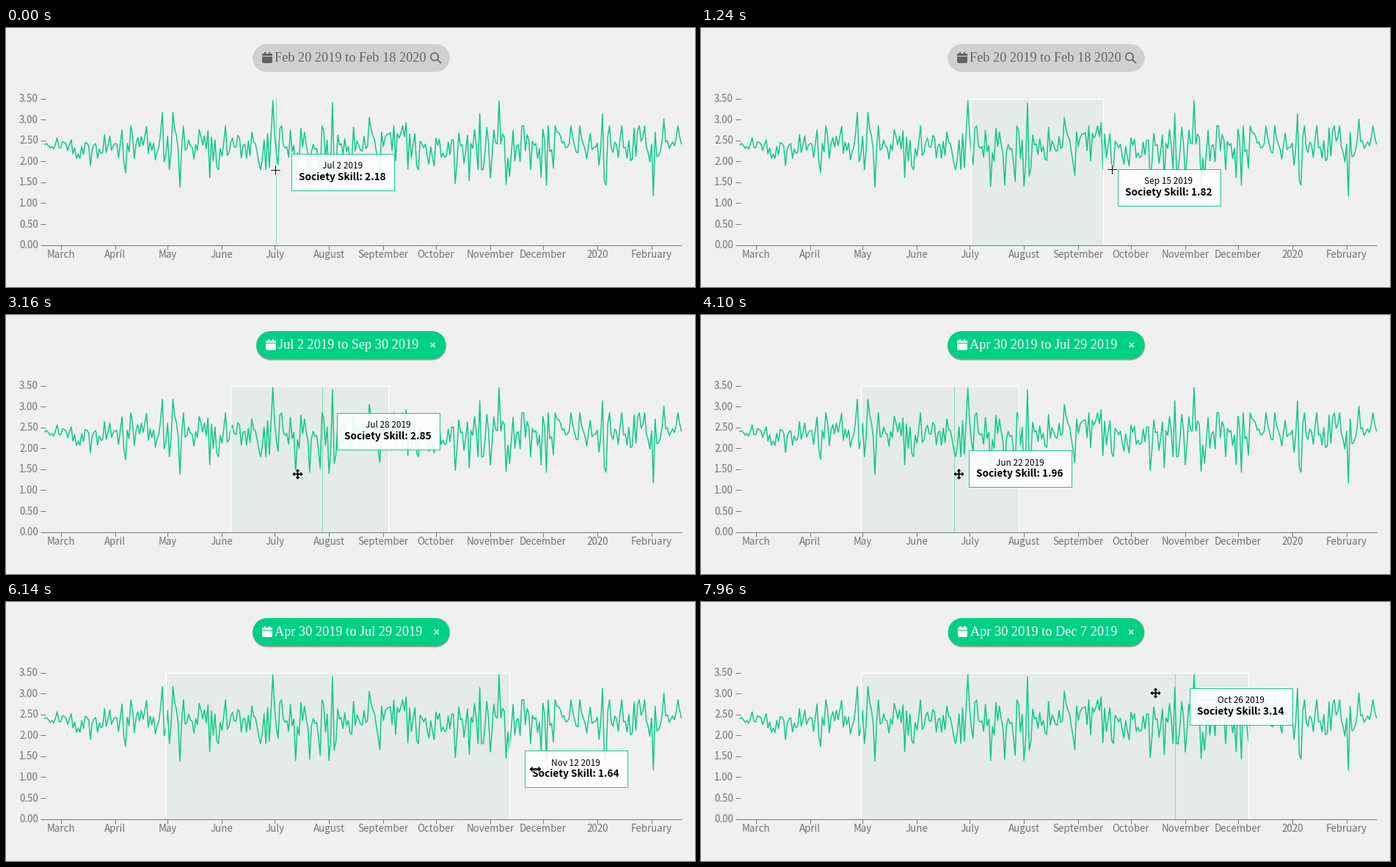
A matplotlib script that plays this animation: 939 px wide and 354 px high, repeating every 8 s.

```python
import numpy as np
import matplotlib.pyplot as plt
from matplotlib.animation import FuncAnimation
from matplotlib.collections import PolyCollection
from matplotlib.patches import Polygon, Rectangle

W, H = 939, 354
LOOP, STEP = 8000, 20
DAYS = 364
FIRST_DAY = np.datetime64("2019-02-20")
BG, GREEN, GREY, INK, AXIS = "#f0f0f0", "#00d084", "#d0d0d0", "#646464", "#727272"
SANS, SERIF = "Noto Sans CJK JP", "Liberation Serif"
MONTHS = ("January February March April May June July August September "
          "October November December").split()
PILL_X, PILL_Y, PILL_R = 470.5, 41, 19

# The tallest highs and deepest lows, day: value
EXTREMES = {
    46: 1.73, 67: 3.17, 73: 3.17, 77: 1.38, 94: 1.61, 122: 1.96, 130: 3.45,
    132: 2.18, 143: 1.4, 151: 1.43, 157: 1.52, 159: 2.73, 162: 1.4,
    164: 3.4, 165: 1.64, 185: 3.05, 191: 1.66, 205: 2.59, 206: 2.92,
    207: 1.82, 234: 1.47, 242: 1.54, 248: 3.14, 254: 1.6, 259: 3.45,
    263: 1.45, 265: 1.64, 283: 1.61, 286: 1.43, 318: 3.13, 319: 1.54,
    320: 1.43, 347: 1.17, 353: 3.01,
}

# Each move: start and end time, easing power, then the state it leads to:
# cursor x, cursor y, hovered day, first and last day of the brush
REST = (367, 194, 132, 132, 132)
MOVES = [
    (540, 1290, 0.70, 560, 193, 211, 132, 211),   # draw the brush
    (1350, 1530, 1.0, 586, 194, 222, 132, 222),
    (1710, 1760, 1.0, 586, 210, 222, 132, 222),   # release
    (2120, 2630, 0.66, 491, 218, 184, 132, 222),
    (3040, 3510, 0.80, 341, 217, 121, 69, 159),   # slide the brush
    (3980, 4630, 2.5, 439, 224, 161, 69, 159),    # release
    (4990, 5320, 0.70, 430, 226, 159, 69, 159),
    (5620, 6310, 0.75, 740, 229, 288, 69, 288),   # stretch the brush
    (6430, 6430, 1.0, 743, 229, 288, 69, 290),
    (6610, 6790, 1.0, 737, 225, 288, 69, 290),    # release
    (7690, 7960, 1.0, 619, 124, 248, 69, 290),
]
RELEASES = (1710, 3980, 6610)
STRETCH = (5620, 6430)
TICK, LEAD = 57, 2  # ms per visible step; steps the pointer runs ahead


def day_x(day):
    return 53 + day * 867.5 / (DAYS - 1)


def value_y(value):
    return 296.5 - value * 200 / 3.5


def date_text(day):
    year, month, date = str(FIRST_DAY + int(round(day))).split("-")
    return f"{MONTHS[int(month) - 1][:3]} {int(date)} {year}"


def make_series():
    """Daily noise around 2.4 that grows over the first weeks."""
    rng = np.random.default_rng(7)
    spread = np.interp(np.arange(DAYS), [0, 14, 60], [0.08, 0.16, 0.31])
    values = np.clip(2.4 + spread * rng.normal(size=DAYS), 1.8, 2.85)
    values[list(EXTREMES)] = list(EXTREMES.values())
    return values


def state_at(t):
    """Cursor x and y, hovered day, brush start and end."""
    before, move = np.array(REST, float), None
    for nxt in MOVES:
        if t < nxt[0]:
            break
        if move:
            before = np.array(move[3:], float)
        move = nxt
    if not move:
        return before
    start, end, power = move[:3]
    count = round((end - start) / TICK) + 1
    done = 1 + (t - start) // (max(end - start, 1) / max(count - 1, 1))
    ahead = np.array([LEAD, LEAD, 0, 0, 0])
    progress = np.minimum((done + ahead) / count, 1) ** power
    return before + (np.array(move[3:]) - before) * progress


def four_way(arm):
    """Repeat one arm in all four directions."""
    points, arm = [], np.array(arm, float)
    for _ in range(4):
        points.extend(arm)
        arm = np.column_stack([-arm[:, 1], arm[:, 0]])
    return np.array(points)


HEAD = np.array([(4, -1.2), (4, -4), (8, 0), (4, 4), (4, 1.2)])
CURSORS = {
    "cross": four_way([(.5, -.5), (6.5, -.5), (6.5, .5)]),
    "move": four_way([(1, -1), (4, -1), (4, -3.2), (7.3, 0), (4, 3.2), (4, 1)]),
    "resize": np.concatenate([HEAD, -HEAD]),
}


def cursor_kind(t, x, start, end):
    if t < RELEASES[0]:
        return "cross"
    near = min(abs(x - start), abs(x - end)) < 5
    if near or STRETCH[0] <= t < STRETCH[1]:
        return "resize"
    return "move" if start < x < end else "cross"


def box(x0, y0, x1, y1):
    return np.array([(x0, y0), (x1, y0), (x1, y1), (x0, y1)])


def calendar(x):
    parts = [(2.5, 33, 4.7, 36), (8.6, 33, 10.8, 36), (0, 34.8, 13.3, 37.8),
             (0, 38.8, 13.3, 47.2), (.7, 47, 12.6, 48)]
    return [box(*part) + (x, 0) for part in parts]


fig = plt.figure(figsize=(W / 72, H / 72), dpi=72, facecolor=BG)
ax = fig.add_axes([0, 0, 1, 1])
ax.set_xlim(0, W)
ax.set_ylim(H, 0)
ax.axis("off")


def line(xs, ys, color, width, z, **kw):
    return ax.plot(xs, ys, color=color, lw=width, zorder=z, **kw)[0]


def rule(xs, ys):
    return line(xs, ys, "#777777", 1, 5, solid_capstyle="butt")


def label(x, y, text, size, color=INK, ha="center", font=SANS, z=8, **kw):
    return ax.text(x, y, text, fontsize=size, color=color, ha=ha,
                   va="baseline", family=font, zorder=z, **kw)


# Axes
rule([53, 921], [296.5, 296.5])
for n in range(8):
    y = value_y(n / 2)
    rule([47, 53.5], [y, y])
    label(43.8, y + 4.6, f"{n / 2:.2f}", 13.3, AXIS, ha="right")
for month in np.arange("2019-03", "2020-03", dtype="datetime64[M]"):
    x = day_x((month.astype("datetime64[D]") - FIRST_DAY).astype(int))
    year, number = str(month).split("-")
    rule([x, x], [296.5, 302.5])
    label(x, 314, year if number == "01" else MONTHS[int(number) - 1],
          13.3, AXIS)

# Series, hover guide and brush
series = make_series()
line(day_x(np.arange(DAYS)), value_y(series), "#0ccb86", 1.5, 3)
guide = line([0, 0], [96.5, 296], "#00c864", 1, 2, alpha=0.42)
brush = ax.add_patch(Rectangle((0, 96.5), 0, 200, fc="#e5ebe8", lw=0, zorder=1))
rim = ax.add_patch(Rectangle((0, 96.5), 0, 200, fill=False, ec="white",
                             lw=1.3, zorder=4))

# Tooltip
tip = ax.add_patch(Rectangle((0, 0), 140, 50, fc=(1, 1, 1, 0.9),
                             ec="#14c998", lw=1, zorder=9))
tip_date = label(0, 0, "", 11.8, "black", z=10)
tip_value = label(0, 0, "", 13.6, "black", z=10, weight="bold")

# Date pill
shadows = [line([0, 0], [PILL_Y + dy] * 2, "black", 2 * PILL_R + grow, 5,
                alpha=a, solid_capstyle="round", snap=False)
           for dy, grow, a in ((1, 2, .06), (1.2, 1, .1), (1.8, 0, .22))]
pill = line([0, 0], [PILL_Y] * 2, GREY, 2 * PILL_R, 6,
            solid_capstyle="round", snap=False)
icon = ax.add_collection(PolyCollection([], lw=0, zorder=7))
pill_text = label(0, 46, "", 18.3, ha="left", font=SERIF)
angle = np.linspace(0, 2 * np.pi, 40)
lens = [line(584 + 5.2 * np.cos(angle), 39.3 + 5.2 * np.sin(angle), INK, 1.6, 7),
        line([588, 592.3], [43.3, 47.4], INK, 1.8, 7)]
close = [line([0, 0], [PILL_Y - 3 * s, PILL_Y + 3 * s], "#d8f8ec", 1.7, 7,
              solid_capstyle="butt") for s in (1, -1)]

# Cursor
halo = ax.add_patch(Polygon(CURSORS["cross"], fc="white", ec="white", lw=1.8,
                            zorder=11))
pointer = ax.add_patch(Polygon(CURSORS["cross"], fc="black", lw=0, zorder=12))


def draw_pill(t):
    released = [r for r in RELEASES if r <= t]
    active = bool(released)
    first, last = state_at(released[-1])[3:] if active else (0, DAYS - 1)
    ink = "white" if active else INK
    pill_text.set_text(f"{date_text(first)} to {date_text(last)}")
    pill_text.set_color(ink)
    half = (pill_text.get_window_extent().width + (67 if active else 62)) / 2
    left, right = PILL_X - half, PILL_X + half
    pill_text.set_x(left + 30)
    pill.set_color(GREEN if active else GREY)
    icon.set_verts(calendar(left + 13))
    icon.set_facecolor(ink)
    for part in shadows + [pill]:
        part.set_xdata([left + PILL_R, right - PILL_R])
    for part in close:
        part.set_xdata([right - 21, right - 15])
    for part in shadows + close:
        part.set_visible(active)
    for part in lens:
        part.set_visible(not active)


def draw_tooltip(day):
    x, y = day_x(day), value_y(series[day])
    guide.set_xdata([x, x])
    left, top = np.floor(x + 20) + 0.5, np.floor(y) + 0.5
    tip.set_xy((left, top))
    tip_date.set_position((left + 70, top + 21))
    tip_date.set_text(date_text(day))
    tip_value.set_position((left + 70, top + 36.3))
    tip_value.set_text(f"Society Skill: {series[day]:.2f}")


def update(i):
    t = (i + 0.5) * STEP
    x, y, day, first, last = state_at(t)
    draw_pill(t)
    draw_tooltip(int(round(day)))

    start, end = day_x(first), day_x(last)
    for part in (brush, rim):
        part.set_visible(t >= MOVES[0][0])
        part.set_x(start)
        part.set_width(end - start)

    shape = CURSORS[cursor_kind(t, x, start, end)] + np.floor([x, y]) + 0.5
    halo.set_xy(shape)
    pointer.set_xy(shape)
    return []


anim = FuncAnimation(fig, update, frames=LOOP // STEP, interval=STEP,
                     repeat=True, repeat_delay=0, blit=False)
plt.show()
```
